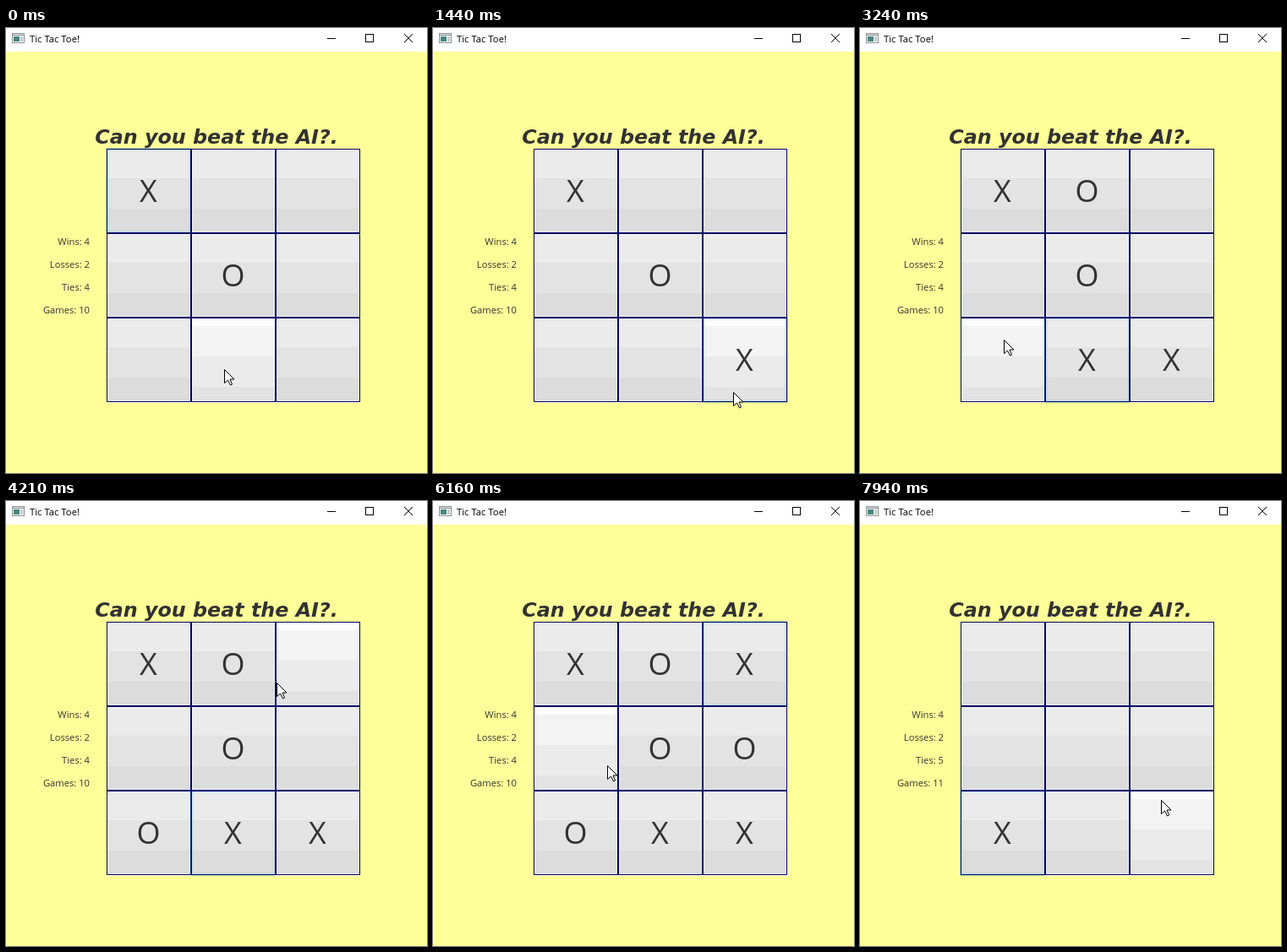
Recreate the animation shown at these times as an HTML page with a canvas. Size 498 by 527 pixels, loop 8000 ms.

```html
<!DOCTYPE html>
<html lang="en">
<head>
<meta charset="utf-8">
<title>Tic Tac Toe!</title>
<style>
html, body { margin: 0; width: 100%; height: 100%; overflow: hidden; background: #ffff99; }
canvas { display: block; }
</style>
</head>
<body>
<canvas id="stage" width="498" height="527"></canvas>
<script>
const ctx = document.getElementById('stage').getContext('2d');
const LOOP = 8000, STEP = 135.4, PHASE = 61;
const LEFT = 119, TOP = 143, SIZE = 100;
const UI = '"Open Sans", "Noto Sans", sans-serif';
const INK = '#323232', NAVY = '#000066';

// Times below count screen updates of STEP ms.
const RESET = 47, NEXT = 53, REPLY = 7;

// Turns: time of click, cell of X, cell of the answering O
const turns = [[-REPLY, 0, 4], [7, 8, 1], [20, 7, 6], [31, 2, 5], [RESET, 3], [NEXT, 6]];

// Pointer stops: time, x, y
const stops = [
  [0, 258, 404], [1, 258, 404], [8, 354, 428], [10, 355, 431], [13, 369, 422],
  [20, 270, 395], [23, 170, 369], [27, 170, 371], [31, 348, 186], [34, 335, 384],
  [37, 329, 374], [41, 384, 326], [45, 206, 313], [48, 210, 318], [51, 180, 389],
  [NEXT, 180, 389], [58, 356, 354]
];

const ease = k => k * k * (3 - 2 * k);

function pointerAt(n) {
  const i = stops.findIndex(s => s[0] > n);
  if (i < 0) return stops[stops.length - 1].slice(1);
  const [n0, x0, y0] = stops[i - 1], [n1, x1, y1] = stops[i];
  const k = ease((n - n0) / (n1 - n0));
  return [Math.round(x0 + (x1 - x0) * k), Math.round(y0 + (y1 - y0) * k)];
}

function marksAt(n) {
  const marks = [];
  for (const [at, x, o] of turns) {
    if (at > n || (n >= RESET && at <= RESET)) continue;
    marks[x] = 'X';
    if (n >= at + REPLY) marks[o] = 'O';
  }
  return marks;
}

function rect(x, y, w, h, color) {
  ctx.fillStyle = color;
  ctx.fillRect(x, y, w, h);
}

function frame(x, y, w, h, color, line = 1) {
  ctx.strokeStyle = color;
  ctx.lineWidth = line;
  ctx.strokeRect(x + line / 2, y + line / 2, w - line, h - line);
}

function text(str, x, y, font, align = 'left', color = INK) {
  ctx.font = font;
  ctx.textAlign = align;
  ctx.fillStyle = color;
  ctx.fillText(str, x, y);
}

function titleBar() {
  rect(0, 0, 498, 28, '#fff');
  rect(7, 6, 15, 12, '#8c9296');
  rect(8, 7, 13, 1, '#dde2e5');
  rect(8, 9, 13, 8, '#f4f4f4');
  rect(9, 10, 7, 6, '#47877f');
  rect(17, 10, 3, 6, '#c9cdd0');
  text('Tic Tac Toe!', 28, 17, '11.3px ' + UI, 'left', '#000');

  rect(380, 12, 10, 1, '#000');
  frame(425, 7, 10, 10, '#000');
  ctx.beginPath();
  ctx.moveTo(471, 7); ctx.lineTo(481, 17);
  ctx.moveTo(481, 7); ctx.lineTo(471, 17);
  ctx.stroke();
}

function cell(i, hover, focused, mark) {
  const x = LEFT + i % 3 * SIZE, y = TOP + Math.floor(i / 3) * SIZE;
  if (focused) frame(x - 1, y - 1, SIZE + 2, SIZE + 2, 'rgba(3,158,211,.3)');
  else rect(x, y + SIZE, SIZE, 1, 'rgba(255,255,255,.7)');

  const shades = ['#fcfcfc', '#f3f3f3', '#ebebeb', '#e3e3e3', '#dcdcdc'];
  const shift = hover ? 82 : 10;
  shades.forEach((color, k) => {
    const top = Math.max(0, shift + 36 * (k - 3) + (hover ? 0 : 25));
    if (top < SIZE) rect(x, y + top, SIZE, SIZE - top, color);
  });

  frame(x + 1, y + 1, SIZE - 2, SIZE - 2, 'rgba(255,255,255,.35)');
  if (focused) frame(x + 1, y + 1, SIZE - 2, SIZE - 2, 'rgba(3,158,211,.15)', 1.6);
  frame(x, y, SIZE, SIZE, NAVY);
  if (mark) text(mark, x + 49.5, y + 63, '36px ' + UI, 'center');
}

function pointer(x, y) {
  const shape = [[0, 0], [0, 16], [4, 12.5], [7, 18.5], [9, 17.5], [6.5, 11.5], [11.5, 11.5]];
  ctx.beginPath();
  for (const [dx, dy] of shape) ctx.lineTo(x + dx + .5, y + dy + .5);
  ctx.closePath();
  ctx.fillStyle = '#fff';
  ctx.fill();
  ctx.strokeStyle = '#000';
  ctx.lineWidth = 1;
  ctx.stroke();
}

function draw(n) {
  rect(0, 0, 498, 527, '#ffff99');
  titleBar();

  const fresh = n >= RESET && n < NEXT;
  const played = n >= RESET ? 1 : 0;
  text(fresh ? "X's turn. Click button to take spot" : 'Can you beat the AI?.',
    249, 137, 'italic bold 23.8px "DejaVu Sans", Verdana, sans-serif', 'center');

  ['Wins: 4', 'Losses: 2', 'Ties: ' + (4 + played), 'Games: ' + (10 + played)]
    .forEach((s, i) => text(s, 99, 257 + 27 * i, '11.2px ' + UI, 'right'));

  const [px, py] = pointerAt(n);
  const over = Math.floor((py - TOP) / SIZE) * 3 + Math.floor((px - LEFT) / SIZE);
  const focus = turns.filter(t => t[0] <= n).pop()[1];
  const marks = marksAt(n);
  for (let i = 0; i < 9; i++) cell(i, i === over, i === focus, marks[i]);
  pointer(px, py);
}

function tick() {
  const t = performance.now() % LOOP;
  draw(Math.max(0, Math.floor((t - PHASE) / STEP)));
  requestAnimationFrame(tick);
}
tick();
</script>
</body>
</html>
```
